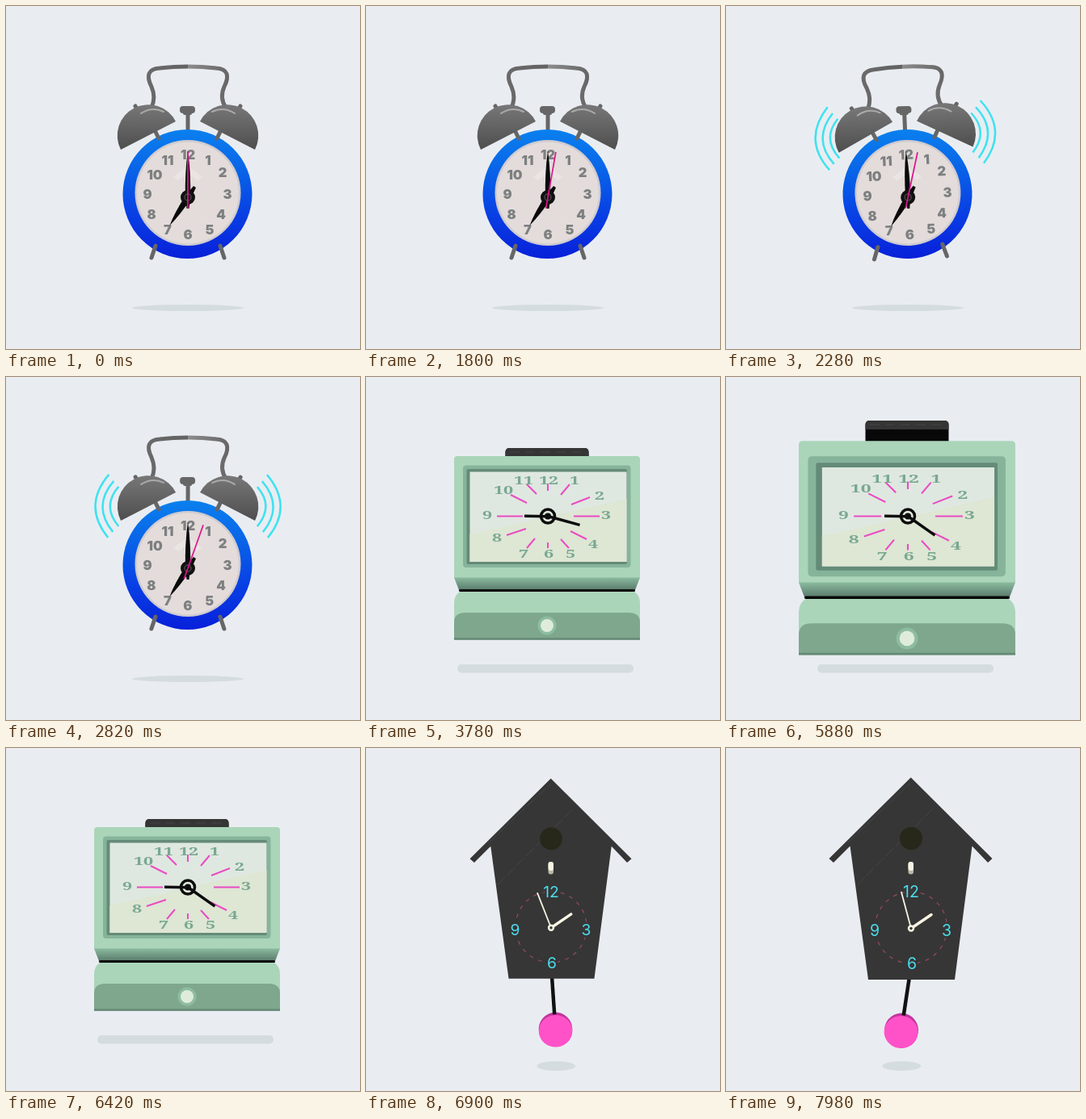
Write an HTML page that moves like this. It is 438 px wide and 425 px high and loops after 8000 ms.

```html
<!DOCTYPE html>
<html lang="en">
<head>
<meta charset="utf-8">
<title>Clocks</title>
<style>
html, body { margin: 0; width: 100%; height: 100%; overflow: hidden; background: #e9edf2; }
svg { display: block; width: 438px; height: 425px; }
text { text-anchor: middle; }
.sans text { font: 900 16.5px Inter, sans-serif; fill: #7d7f80; }
.slab text { font: 900 14px "Noto Serif", serif; fill: #78a891; }
.thin text { font: 400 19.5px Inter, sans-serif; fill: #4ddcec; stroke: #363636; stroke-width: 5; paint-order: stroke; }
.steel { fill: none; stroke: #666; stroke-width: 5; stroke-linecap: round; }
.wave { fill: none; stroke: #3fe2f0; stroke-width: 2.5; }
.ink { stroke: #0c0c0c; stroke-width: 3.5; }
.cream { stroke: #f8f4e2; stroke-linecap: round; }
.tick { stroke: #ea4cc3; stroke-width: 2; }
.shade { fill: #d5dcdf; }
</style>
</head>
<body>
<svg viewBox="0 0 438 425">
  <defs>
    <linearGradient id="blue" x2="0" y2="1">
      <stop stop-color="#0a80ee"/><stop offset=".3" stop-color="#0965e8"/><stop offset=".65" stop-color="#0840e4"/><stop offset="1" stop-color="#0820da"/>
    </linearGradient>
    <linearGradient id="bellFill" x2="0" y2="1">
      <stop stop-color="#777"/><stop offset="1" stop-color="#4e4e4e"/>
    </linearGradient>
    <linearGradient id="wire" gradientUnits="userSpaceOnUse" x1="175" x2="275" y1="0" y2="0">
      <stop stop-color="#6a6a6a"/><stop offset=".5" stop-color="#626262"/><stop offset=".5" stop-color="#8c8c8c"/><stop offset="1" stop-color="#666"/>
    </linearGradient>
    <linearGradient id="under" x2="0" y2="1">
      <stop stop-color="#8aba9f"/><stop offset="1" stop-color="#5a7a6b"/>
    </linearGradient>
    <g id="bell">
      <path class="steel" d="M184 154L189 164M160 124L165 132"/>
      <path fill="url(#bellFill)" d="M142 178A38 38 0 0 1 210 143Z"/>
      <path d="M167 133Q181 124 195 131" fill="none" stroke="#aaa" stroke-width="2" stroke-linecap="round"/>
      <path class="steel" d="M185 297L180 312"/>
    </g>
    <g id="waves" class="wave">
      <path d="M127 121Q94 160 126 199M133 129Q106 160 132 192M139 136Q118 160 139 185"/>
    </g>
  </defs>

  <g id="alarm">
    <ellipse class="shade" cx="225" cy="374" rx="69" ry="4"/>
    <g id="ringer">
      <g id="waveLeft"><use href="#waves"/></g>
      <g id="waveRight"><use href="#waves" transform="matrix(-1 0 0 1 450 0)"/></g>
      <path fill="none" stroke="url(#wire)" stroke-width="5" d="M180 126C184 117 184 109 180 100C173 86 176 78 190 77Q207 75 225 75Q243 75 260 77C274 78 277 86 270 100C266 109 266 117 272 126"/>
      <path class="steel" style="stroke-linecap:butt" d="M225 133V155"/>
      <rect x="215" y="124" width="19" height="9" rx="4" fill="#666"/>
      <rect x="219" y="126" width="11" height="9" rx="2" fill="#666"/>
      <circle cx="224.5" cy="233" r="80" fill="url(#blue)"/>
      <use href="#bell"/>
      <use href="#bell" transform="matrix(-1 0 0 1 450 0)"/>
      <circle cx="225" cy="231.500" r="65.500" fill="#cfcbd0"/>
      <circle cx="225" cy="231.500" r="63" fill="#e3dcda"/>
      <path d="M207 212L225 198L243 212L237 216L225 207L213 216Z" fill="#f0ebea" opacity=".6"/>
      <g id="alarmDigits" class="sans"></g>
      <path d="M202.500 272Q208 257 222 235L232 223L235 225L228 240Q216 258 202.500 272Z" fill="#0a0a0a"/>
      <path d="M225 179Q229 208 228 237L226.500 251H223.500L222 237Q221 208 225 179Z" fill="#0a0a0a"/>
      <circle cx="225" cy="237" r="9" fill="#111"/>
      <circle cx="225" cy="237" r="4" fill="none" stroke="#4a4448" stroke-width="1.500"/>
      <path id="sweep" d="M225 180V251" stroke="#dc148e" stroke-width="1.700"/>
    </g>
  </g>

  <g id="punch">
    <rect class="shade" x="113" y="356" width="218" height="10.500" rx="5"/>
    <g id="lever">
      <rect x="172.500" y="88" width="103" height="90" rx="5" fill="#080808"/>
      <path d="M172.500 99V93Q172.500 88 177.500 88H270.500Q275.500 88 275.500 93V99Z" fill="#353535"/>
      <path d="M178 93H271" stroke="#444" stroke-dasharray="12 7"/>
    </g>
    <g id="case">
      <path fill="#aad5b9" d="M109 249V102Q109 98 113 98H335Q339 98 339 102V249Z"/>
      <path fill="url(#under)" d="M109 248.500H339L333 264H115Z"/>
      <path fill="#aad5b9" d="M116 266H332Q339 271 339 280V325H109V280Q109 271 116 266Z"/>
      <path d="M116.500 264.500H331.500" stroke="#080808" stroke-width="3" stroke-linecap="round"/>
      <path fill="#7fa78d" d="M109 325.500V304Q109 292 123 292H325Q339 292 339 304V325.500Z"/>
      <path d="M109 324.500H339" stroke="#658a76" stroke-width="2.500"/>
      <circle cx="224" cy="308" r="11.500" fill="#8dbda0"/>
      <circle cx="224" cy="308" r="8" fill="#dfecdc"/>
    </g>
    <g id="frame"><rect x="120" y="109.500" width="207.500" height="126.500" rx="4" fill="#86b49b"/></g>
    <g id="bevel"><rect x="124.500" y="114" width="198.500" height="118" rx="2" fill="#648b78"/></g>
    <g id="glass">
      <rect x="128.500" y="117.500" width="194" height="111.500" fill="#dfe8e0"/>
      <path d="M128.500 195L322.500 151V229H128.500Z" fill="#dee6d4"/>
    </g>
    <g id="dial">
      <path class="tick" d="M225 132V141M252 133L241 146M277 149L254 158M257 172.500H289M273 201L253 191M251 212L241 201M225 212V205M199 212L209 200M174 196L198 188M162 172.500H194M179 146L199 156M199 133L211 145"/>
      <g id="punchDigits" class="slab"></g>
    </g>
    <circle cx="225" cy="172.500" r="8.500" fill="#dfe8dc" class="ink"/>
    <path class="ink" d="M196 172.300L225 172.700"/>
    <path class="ink" id="punchHand" d="M225 172.500H266"/>
    <circle cx="225" cy="172.500" r="4" fill="#0c0c0c"/>
  </g>

  <g id="cuckoo">
    <ellipse class="shade" id="bobShade" cx="229" cy="394" rx="24" ry="6"/>
    <g id="house">
      <g id="pendulum">
        <circle cx="229" cy="350.500" r="21" fill="#c4359d"/>
        <ellipse cx="229" cy="353" rx="21" ry="20" fill="#ff52c8"/>
        <path d="M229 262V332" stroke="#111" stroke-width="4.500"/>
      </g>
      <path fill="#363636" d="M228.700 36.500L127.500 137L133 142L153.500 121.500L176 287H283L304.500 121.500L324 142L329.500 137Z"/>
      <path d="M162 170L258 73M150 118L228 44" fill="none" stroke="#4a4a4a" stroke-width=".8" stroke-dasharray="14 3"/>
      <circle cx="229" cy="112" r="14" fill="#27271a"/>
      <rect x="225.500" y="141" width="6.500" height="15.500" rx="3" fill="#b9b6aa"/>
      <rect x="225.500" y="141" width="6.500" height="11" rx="3" fill="#f8f4e2"/>
      <circle cx="229" cy="222.500" r="44.500" fill="none" stroke="#99485f" stroke-width="1.200" stroke-dasharray="5 6.650"/>
      <g id="cuckooDigits" class="thin"></g>
      <path class="cream" d="M229 223.500L254 206.500" stroke-width="3.500"/>
      <path class="cream" id="cuckooHand" d="M229 223.500V177" stroke-width="1.800"/>
      <circle cx="229" cy="223.500" r="4.200" fill="#f8f4e2"/>
      <circle cx="229" cy="223.500" r="1.700" fill="#363636"/>
    </g>
  </g>
</svg>
<script>
const LOOP = 8000, TO_PUNCH = 3120, TO_CUCKOO = 6560;
const el = id => document.getElementById(id);
const set = (id, name, value) => el(id).setAttribute(name, value);
const move = (id, value) => set(id, "transform", value);
const scale = (id, k, x, y) => move(id, `translate(${x} ${y}) scale(${k}) translate(${-x} ${-y})`);

// digits: [label, centre x, centre y]; wide sets the face's letter proportion
function digits(id, list, rise, wide = 1) {
  el(id).innerHTML = list.map(([label, x, y]) =>
    `<text transform="translate(${x} ${y + rise}) scale(${wide} 1)">${label}</text>`).join("");
}
digits("alarmDigits", [[12, 225, 184], [1, 250, 191], [2, 268, 206], [3, 274, 233], [4, 266, 258], [5, 252, 277],
  [6, 225, 283], [7, 200, 277], [8, 180, 258], [9, 175, 233], [10, 184, 209], [11, 200, 191]], 6);
digits("punchDigits", [[12, 226, 128], [1, 258, 128], [2, 289, 147], [3, 297, 171], [4, 281, 207], [5, 253, 219],
  [6, 226, 219], [7, 195, 219], [8, 162, 199], [9, 150, 171], [10, 170, 140], [11, 195, 128]], 5, 1.55);
digits("cuckooDigits", [[12, 229, 178], [3, 273, 226], [6, 230, 267], [9, 184, 226]], 7);

// steps: [time, value]
function track(t, steps, ease = u => u * u * (3 - 2 * u)) {
  if (t <= steps[0][0]) return steps[0][1];
  for (let i = 1; i < steps.length; i++) {
    const [a, from] = steps[i - 1], [b, to] = steps[i];
    if (t < b) return from + (to - from) * ease((t - a) / (b - a));
  }
  return steps[steps.length - 1][1];
}
const linear = u => u;

function drawAlarm(t) {
  const angle = track(t, [[0, 0], [1800, 10], [2820, 19.5], [3120, 21.5]], linear);
  move("sweep", `rotate(${angle} 225 237)`);
  const shake = t > 2160 && t < 3060 ? 2.5 * Math.sin((t - 2820) / 120 * Math.PI) : 0;
  const size = track(t, [[2960, 1], [3080, 1.06], [3120, 1.03]]);
  move("ringer", `translate(225 233) rotate(${shake}) scale(${size}) translate(-225 -233)`);
  const phase = ((t - 2160) % 480) / 480;
  const ringing = t >= 2160 && t < 3060;
  const out = 10 - 26 * phase;
  move("waveLeft", `translate(${out} 0)`);
  move("waveRight", `translate(${-out} 0)`);
  const alpha = ringing ? Math.min(1, phase * 6, (1 - phase) * 5) : 0;
  set("waveLeft", "opacity", alpha);
  set("waveRight", "opacity", alpha);
}

function drawPunch(t) {
  const grow = track(t, [[3120, -.08], [3240, .04], [3360, 0], [5400, 0], [5520, .107], [5680, .37], [5880, .165], [6060, 0]]);
  scale("case", 1 + grow, 224, 211.5);
  scale("frame", 1 + grow * 1.08, 224, 173);
  scale("bevel", 1 + grow * .8, 224, 173);
  scale("glass", 1 + grow * .6, 226, 173);
  scale("dial", 1 + grow * .37, 225, 172.5);
  const lift = track(t, [[3280, 0], [3420, 4], [3560, 0], [5380, 0], [5520, 29], [5680, 65], [5880, 34], [6060, 0]]);
  move("lever", `translate(0 ${-lift})`);
  const angle = track(t, [[3120, 10], [3780, 15.4], [5400, 35.2]], linear);
  move("punchHand", `rotate(${angle} 225 172.5)`);
}

function drawCuckoo(t) {
  scale("house", track(t, [[6560, .8], [6720, 1.08], [6900, .99], [7020, 1]]), 229, 150);
  const swing = 8.6 * Math.cos((t - 7980) / 1600 * 2 * Math.PI);
  move("pendulum", `rotate(${swing} 229 270)`);
  set("bobShade", "cx", 229.5 - 82 * Math.sin(swing * Math.PI / 180));
  move("cuckooHand", `rotate(${-15 + (t - 7980) * .006} 229 223.5)`);
}

const scenes = [["alarm", 0, TO_PUNCH, drawAlarm], ["punch", TO_PUNCH, TO_CUCKOO, drawPunch], ["cuckoo", TO_CUCKOO, LOOP, drawCuckoo]];
const start = performance.now();
function render() {
  const t = Math.max(0, performance.now() - start) % LOOP;
  for (const [id, from, to, draw] of scenes) {
    const on = t >= from && t < to;
    set(id, "display", on ? "inline" : "none");
    if (on) draw(t);
  }
  requestAnimationFrame(render);
}
render();
</script>
</body>
</html>
```
